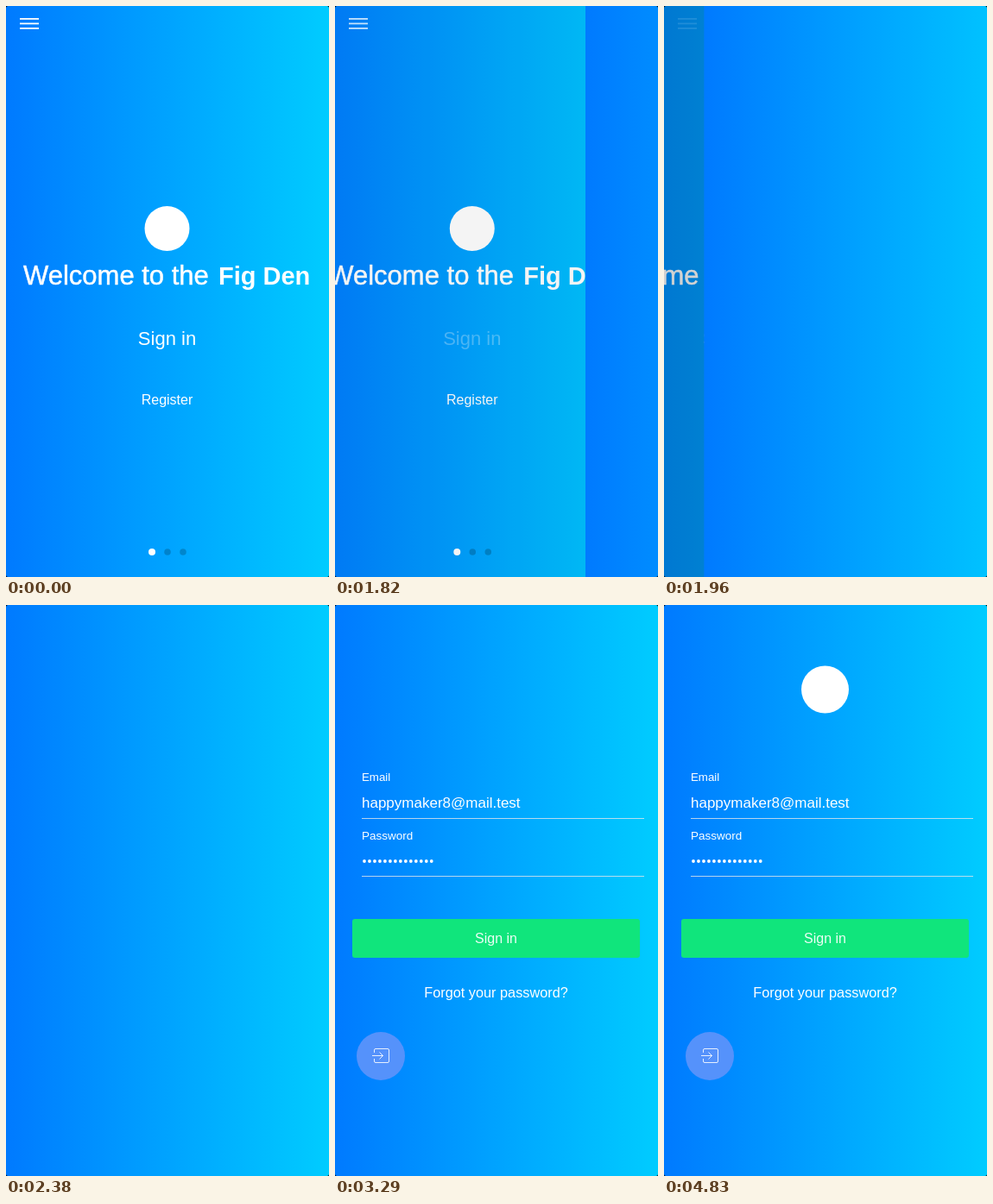
Write an HTML page with a canvas that moves like this. It is 374x662 px and loops after 4.9 s.

```html
<!DOCTYPE html>
<html lang="en">
<head>
<meta charset="utf-8">
<title>Welcome and sign in</title>
<style>
html, body { margin: 0; width: 100%; height: 100%; overflow: hidden; background: #000; }
canvas { display: block; width: 374px; height: 662px; }
</style>
</head>
<body>
<canvas id="stage" width="374" height="662"></canvas>
<script>
const W = 374, H = 662, LOOP = 4900;
const FONT = '"Liberation Sans", Arial, sans-serif';
const PRESS = 1680;
const PUSH = { start: 1767, length: 510 };
const FORM = { start: 2485, length: 750 };
const LOGO = { start: 3360, length: 800 };
const ctx = document.getElementById('stage').getContext('2d');

// CSS-style cubic bezier, solved by bisection
function bezier(x1, y1, x2, y2) {
  const at = (a, b, s) => 3 * (1 - s) * (1 - s) * s * a + 3 * (1 - s) * s * s * b + s * s * s;
  return x => {
    if (x <= 0) return 0;
    if (x >= 1) return 1;
    let lo = 0, hi = 1;
    for (let i = 0; i < 30; i++) {
      const mid = (lo + hi) / 2;
      if (at(x1, x2, mid) < x) lo = mid; else hi = mid;
    }
    return at(y1, y2, lo);
  };
}
const pushEase = bezier(0.36, 0.66, 0.04, 1);
const ease = bezier(0.25, 0.1, 0.25, 1);
const phase = (t, span) => (t - span.start) / span.length;

const sky = ctx.createLinearGradient(0, 0, W, 0);
sky.addColorStop(0, '#007aff');
sky.addColorStop(1, '#00ccff');

function text(str, x, y, size, align = 'left', weight = 400) {
  ctx.font = `${weight} ${size}px ${FONT}`;
  ctx.textAlign = align;
  ctx.fillText(str, x, y);
}

function disc(x, y, r, color = '#fff') {
  ctx.fillStyle = color;
  ctx.beginPath();
  ctx.arc(x, y, r, 0, Math.PI * 2);
  ctx.fill();
}

function layer(dx, dy, alpha, draw) {
  if (alpha <= 0) return;
  ctx.save();
  ctx.translate(dx, dy);
  ctx.globalAlpha = alpha;
  ctx.fillStyle = '#fff';
  draw();
  ctx.restore();
}

function background() {
  ctx.fillStyle = sky;
  ctx.fillRect(0, 0, W, H);
  ctx.fillStyle = '#fff';
}

function menu() {
  for (const y of [14, 19.5, 25]) ctx.fillRect(16, y, 22, 1.8);
}

function home(pressed) {
  background();
  disc(186.5, 258, 26);
  text('Welcome to the', 20, 323, 31);
  ctx.strokeStyle = '#fff';
  ctx.lineWidth = 0.5;
  ctx.strokeText('Welcome to the', 20, 323);
  text('Fig Den', 246, 323, 29, 'left', 700);
  layer(0, 0, pressed ? 0.3 : 1, () => text('Sign in', 186.5, 393, 22, 'center'));
  text('Register', 186.5, 462, 16, 'center');
  disc(169, 633, 4);
  for (const x of [187, 205]) disc(x, 633, 3.8, 'rgba(0,0,0,0.2)');
}

function fields() {
  text('Email', 31, 204, 13.3);
  text('happymaker8@mail.test', 31, 235, 17);
  text('Password', 31, 272, 13.5);
  for (let i = 0; i < 14; i++) disc(34 + i * 5.98, 297, 1.9);
  ctx.fillStyle = 'rgba(225,230,235,0.8)';
  for (const y of [247, 314]) ctx.fillRect(31, y, 327, 1);
}

function button() {
  ctx.fillStyle = '#10e57c';
  ctx.beginPath();
  ctx.roundRect(20, 364, 333, 45, 3);
  ctx.fill();
  ctx.fillStyle = 'rgba(255,255,255,0.92)';
  text('Sign in', 186.5, 392, 16, 'center');
}

function enterIcon() {
  disc(53, 523, 28, '#5592fb');
  ctx.strokeStyle = 'rgba(255,255,255,0.85)';
  ctx.lineWidth = 1;
  ctx.beginPath();
  ctx.moveTo(45.5, 519);
  ctx.lineTo(45.5, 516);
  ctx.arcTo(45.5, 514.5, 47, 514.5, 1.5);
  ctx.arcTo(62.5, 514.5, 62.5, 516, 1.5);
  ctx.arcTo(62.5, 530.5, 61, 530.5, 1.5);
  ctx.arcTo(45.5, 530.5, 45.5, 529, 1.5);
  ctx.lineTo(45.5, 526);
  ctx.moveTo(43, 522.5);
  ctx.lineTo(55.5, 522.5);
  ctx.moveTo(51.5, 518.5);
  ctx.lineTo(55.5, 522.5);
  ctx.lineTo(51.5, 526.5);
  ctx.stroke();
}

// Each part slides in from the left by its own width
const parts = [
  [344, fields],
  [333, button],
  [200, () => text('Forgot your password?', 186.5, 455, 16.3, 'center')],
  [56, enterIcon]
];

function login(t) {
  background();
  const p = ease(phase(t, FORM));
  for (const [width, draw] of parts) layer(-width * (1 - p), 0, p, draw);
  const q = ease(phase(t, LOGO));
  layer(0, -55 * (1 - q), q, () => disc(186.5, 98, 27.5));
}

function render(t) {
  const p = pushEase(phase(t, PUSH));
  ctx.fillStyle = '#000';
  ctx.fillRect(0, 0, W, H);
  ctx.save();
  ctx.beginPath();
  ctx.roundRect(0, 0, W, H, 2.5);
  ctx.clip();
  if (p < 1) {
    layer(-W * 0.33 * p, 0, 1, () => home(t >= PRESS));
    ctx.fillStyle = `rgba(0,0,0,${0.2 * p})`;
    ctx.fillRect(0, 0, W, H);
    layer(0, 0, 1 - p, menu);
  }
  if (p > 0) layer(W * (1 - p), 0, 1, () => login(t));
  ctx.restore();
}

let start;
function tick(now) {
  start ??= now;
  render((now - start) % LOOP);
  requestAnimationFrame(tick);
}
render(0);
requestAnimationFrame(tick);
</script>
</body>
</html>
```
